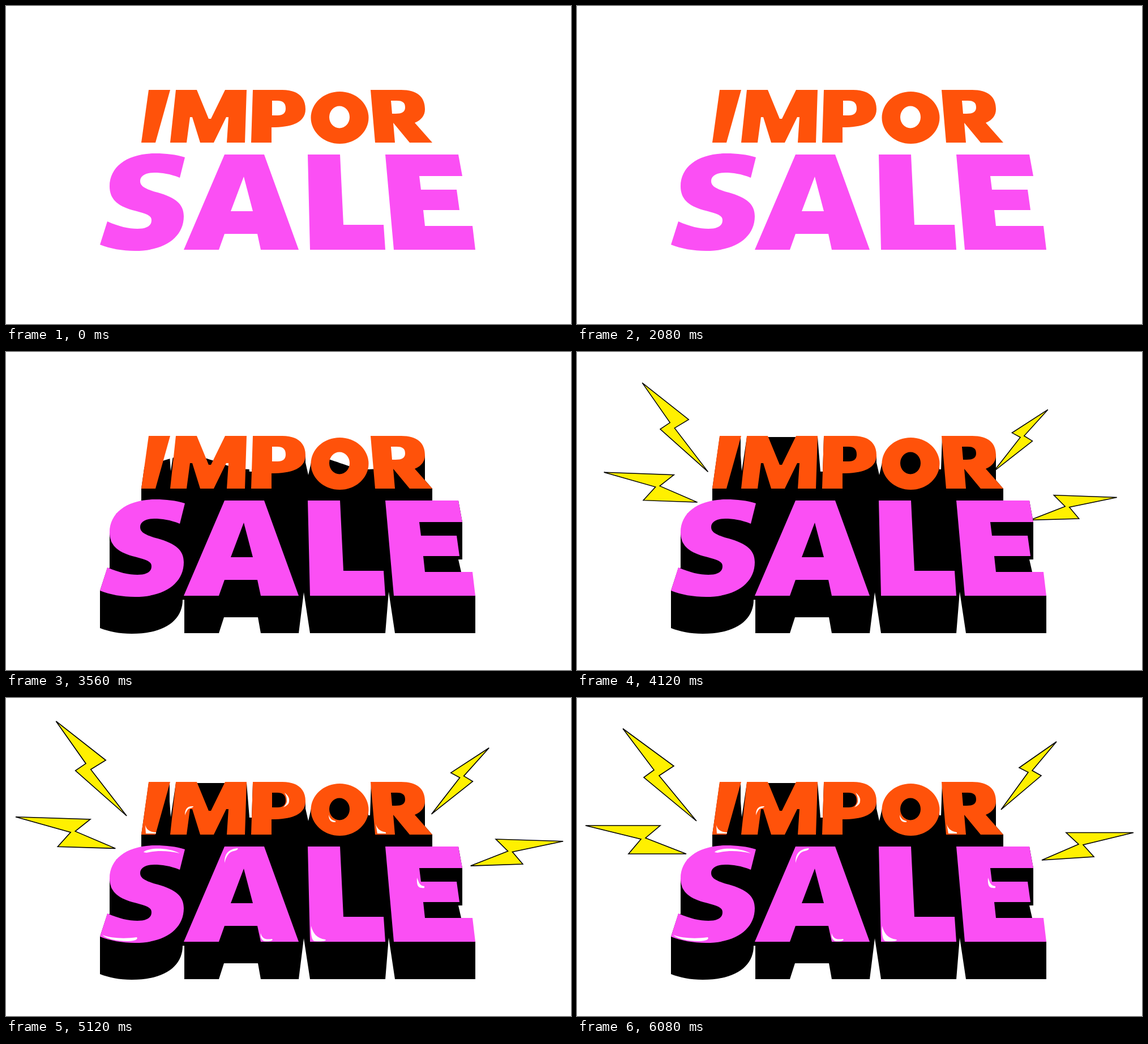
Recreate the animation shown at these times as an HTML page. Size 998x561 px, loop 7.24 s.

```html
<!DOCTYPE html>
<html lang="en">
<head>
<meta charset="utf-8">
<title>Impor Sale</title>
<style>
  html, body { margin: 0; width: 100%; height: 100%; overflow: hidden; background: #fff; }
  svg { display: block; width: 100%; height: 100%; }
</style>
</head>
<body>
<svg viewBox="0 0 998 561" role="img" aria-label="IMPOR SALE">
  <defs>
    <clipPath id="liquid"><path id="surface"/></clipPath>
  </defs>

  <g id="bolts" fill="#fff000" stroke="#000" stroke-width="1.6">
    <path d="M81 54L171 120L145 137L211 217L118 140L136 127Z"/>
    <path d="M15 225H147L121 247L193 275H91L113 249Z"/>
    <path d="M847 77L781 123L797 131L749 197L820 137L804 128Z"/>
    <path d="M983 237.500H864L886 258L821 286L913 280L894 259Z"/>
  </g>

  <g clip-path="url(#liquid)">
    <path d="M239 241L252 150H289V182L291 210L300 150H425L430 211H434L436 150H490L524 170L529 185V195L534 217
      L539 195L555 165L589 153L624 165L640 197V207H643L645 150H700L735 168L740 182V226L753 241V262H799
      L806 300V366H799L804 388L829 430V496H687L676 423L670 496H537L526 424L517 496H450L445 468H385L376 496H315V437H312
      C312 472 282 497 222 497C200 497 181 493 166 487V421L179 381H183V318L195 285L240 262H239Z"/>
  </g>

  <g fill="#ff520a" fill-rule="evenodd">
    <path d="M252 148H290L264 241H239Z"/>
    <path d="M300 148H337L358 199H362L387 148H425L422 241H390L393 196H389L367 241H343L329 196H325L319 241H290Z"/>
    <path d="M436 148H488C514 148 529 160 529 182C529 204 508 214 469 214V241H433Z
      M470 167V193H480C489 193 494 189 494 181C494 171 489 167 479 167Z"/>
    <path d="M538.500 197a51 46 0 0 1 102 0a51 46 0 0 1-102 0Z M571 196a18 19.500 0 0 0 36 0a18 19.500 0 0 0-36 0Z"/>
    <path d="M644 148H698C726 148 740 160 740 182C740 193 734 201 722 206L753 241H713L684 206L687 241H652Z
      M680 167L682 190H688C699 190 705 187 705 179C705 170 700 167 690 167Z"/>
  </g>

  <g fill="#fb4ff4" fill-rule="evenodd">
    <path d="M316 267L307 303C290 296 275 294 262 294C246 294 237 300 237 309C237 318 246 323 268 329
      C300 338 314 350 314 371C314 408 280 432 228 432C205 432 184 428 166 421L179 380C199 389 217 393 232 393
      C248 393 257 388 257 378C257 369 247 366 223 360C196 352 183 340 183 318C183 283 215 260 264 260C283 260 300 262 316 267Z"/>
    <path d="M386 262H456L517 430H450L444 402H386L376 430H314Z M420 301L397 362H436Z"/>
    <path d="M533 262H590L596 386H667L670 430H537Z"/>
    <path d="M670 262H799L806 300H730L733 324H796L801 360H737L740 388H824L829 430H685Z"/>
  </g>

  <g id="glints" fill="#fff">
    <path d="M243 272C250 264 285 263 307 274C285 269 265 269 248 273Z"/>
    <path d="M170 418C185 424 210 425 231 422C234 425 229 429 215 429C195 429 178 425 170 418Z"/>
    <path d="M386 291C386 275 392 267 409 265C411 266 408 269 402 270C393 272 389 280 386 291Z"/>
    <path d="M450 415C452 424 458 427 470 425C473 428 466 430 456 429C451 427 449 421 450 415Z"/>
    <path d="M539 402C542 415 549 424 564 426C567 428 562 430 545 429C540 428 538 415 539 402Z"/>
    <path d="M726 317C730 327 731 331 739 332V335C729 336 725 333 726 317Z"/>
    <path d="M246 224C248 232 253 236 265 237V239H247Z"/>
    <path d="M316 207C316 196 320 190 331 191C331 194 323 194 321 197C319 200 317 203 316 207Z"/>
    <path d="M492 167C499 172 501 178 500 182C500 187 496 190 490 193C494 188 497 184 496 180C496 176 495 172 492 167Z"/>
    <path d="M570 206C572 213 576 216 582 217V219C573 220 570 214 570 206Z"/>
    <path d="M653 222C655 230 660 235 671 237V239H656Z"/>
  </g>
</svg>

<script>
const LOOP = 7240;
const FILL = { start: 2187, end: 4050, from: 508, to: 135 };
const WAVE = { length: 212, height: 12, speed: -0.164 };
const POP = { start: 3900, end: 4267 };
const SWING = { peak: 4720, period: 453.3, end: 5400, degrees: 1.03 };
const GLINT = { start: 4200, end: 4480 };

const surface = document.getElementById('surface');
const bolts = document.getElementById('bolts');
const glints = document.getElementById('glints');

const progress = (t, { start, end }) => Math.min(1, Math.max(0, (t - start) / (end - start)));
const easeInOut = p => (1 - Math.cos(Math.PI * p)) / 2;
const easeOut = p => 1 - (1 - p) ** 3;

function surfacePath(t) {
  const level = FILL.from + (FILL.to - FILL.from) * easeInOut(progress(t, FILL));
  const trough = 765 + WAVE.speed * (t - 2800);
  let d = 'M150 561';
  for (let x = 150; x <= 850; x += 5) {
    const y = level + WAVE.height * Math.cos(2 * Math.PI * (x - trough) / WAVE.length);
    d += `L${x} ${y.toFixed(1)}`;
  }
  return d + 'L850 561Z';
}

function swingAngle(t) {
  if (t >= SWING.end) return 0;
  const phase = 2 * Math.PI * (Math.max(t, POP.end) - SWING.peak) / SWING.period;
  return SWING.degrees * (1 + Math.cos(phase));
}

function draw(t) {
  surface.setAttribute('d', t < FILL.start ? '' : surfacePath(t));

  const scale = easeOut(progress(t, POP));
  bolts.style.display = scale > 0 ? '' : 'none';
  bolts.setAttribute('transform',
    `translate(499 281) rotate(${swingAngle(t)}) scale(${scale}) translate(-499 -281)`);

  glints.setAttribute('opacity', progress(t, GLINT));
}

const begin = performance.now();
function tick() {
  draw((performance.now() - begin) % LOOP);
  requestAnimationFrame(tick);
}
tick();
</script>
</body>
</html>
```
